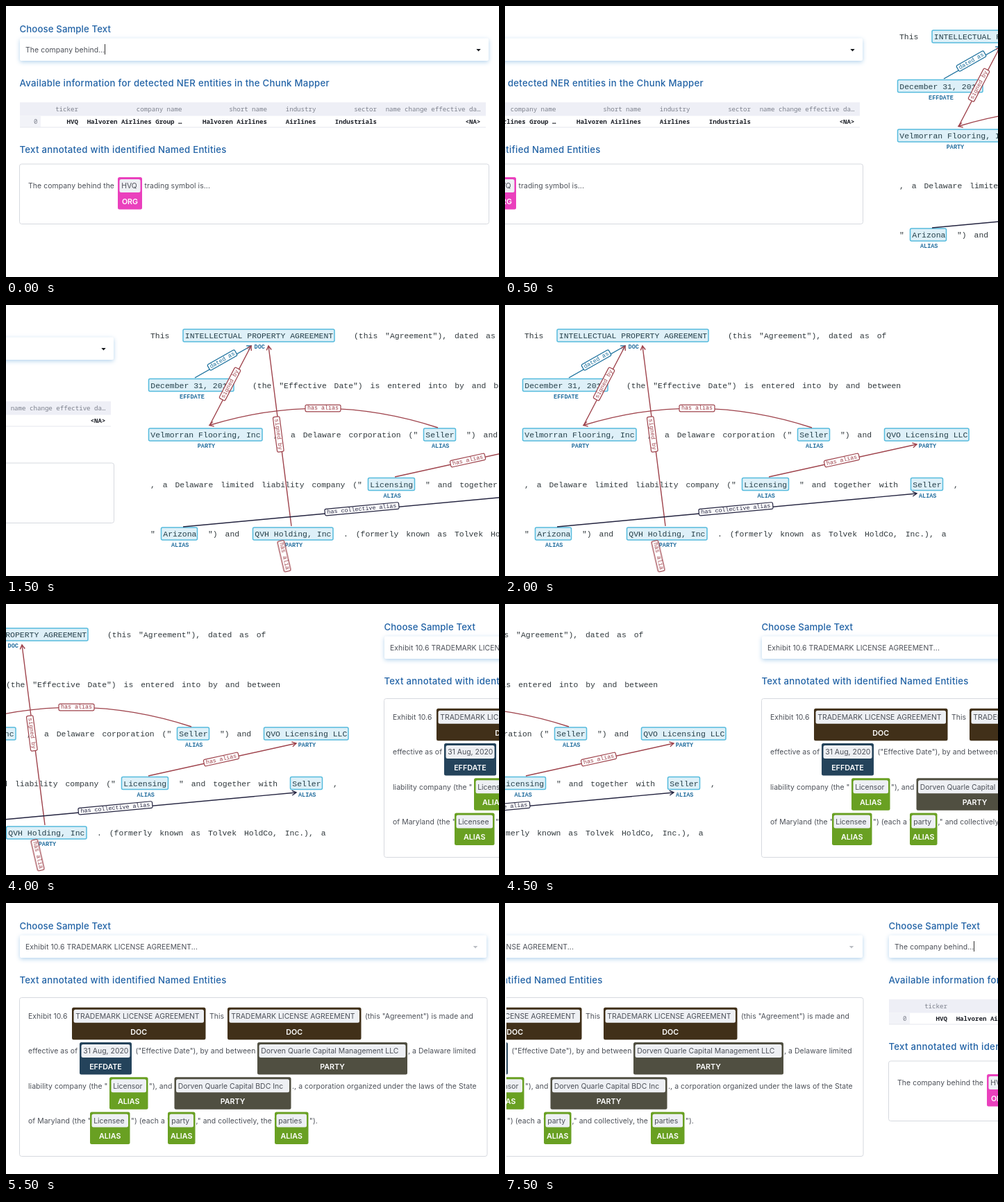
These frames come from a looping animation (710 by 391 pixels, 8 s). An HTML page:

```html
<!DOCTYPE html>
<html lang="en">
<head>
<meta charset="utf-8">
<title>Entity annotation carousel</title>
<style>
  html, body { margin: 0; width: 100%; height: 100%; overflow: hidden; background: #fff; }
  svg { display: block; width: 710px; height: 391px; }
  text { white-space: pre; }
  .sans { font: 400 10.4px Inter, "Open Sans", sans-serif; letter-spacing: .08px; fill: #4c5058; }
  .label, .head { font: 500 13.2px Inter, "Open Sans", sans-serif; letter-spacing: .12px; fill: #2263a6; }
  .head { letter-spacing: .28px; }
  .chip { font: 400 10.45px Inter, "Open Sans", sans-serif; fill: #4c5058; }
  .tag { font: 600 10.7px Inter, "Open Sans", sans-serif; fill: #fff; text-anchor: middle; }
  .th, .td { font: 400 9.13px "Noto Sans Mono", "DejaVu Sans Mono", monospace; fill: #7d818d; text-anchor: end; }
  .td { font-weight: 600; fill: #1d2028; }
  .mono { font: 400 11.42px "Liberation Mono", monospace; fill: #30383c; word-spacing: 4.05px; }
  .ent { font: 400 11.48px "Liberation Mono", monospace; fill: #26404a; }
  .kind { font: 700 8.5px "Liberation Mono", monospace; fill: #246f9f; text-anchor: middle; }
  .rel { font: 400 8.35px "Liberation Mono", monospace; text-anchor: middle; }
  .select { fill: #fff; filter: drop-shadow(0 2px 3px #b4d3ed); }
  .panel { fill: #fff; stroke: #d6d9df; }
</style>
</head>
<body>
<svg viewBox="0 0 710 391">
  <defs><clipPath id="crop"><rect width="710" height="386"/></clipPath></defs>
  <g id="strip"></g>
  <rect id="edge" width="2" height="391" fill="#fff" opacity="0"/>
</svg>
<script>
const NS = "http://www.w3.org/2000/svg";
const strip = document.getElementById("strip");

function add(parent, tag, attrs, text) {
  const el = document.createElementNS(NS, tag);
  for (const key in attrs) el.setAttribute(key, attrs[key]);
  if (text !== undefined) el.textContent = text;
  parent.appendChild(el);
  return el;
}
const slide = x => add(strip, "g", { transform: `translate(${x} 0)` });
const write = (g, cls, x, y, s) => add(g, "text", { class: cls, x, y }, s);
const box = (g, x1, y1, x2, y2, more) =>
  add(g, "rect", { x: x1, y: y1, width: x2 - x1, height: y2 - y1, ...more });

function select(g, right, text, caretX, caretColor) {
  write(g, "label", 19.5, 38.3, "Choose Sample Text");
  box(g, 20, 46.5, right, 79, { class: "select", rx: 2 });
  write(g, "sans", 28, 66.5, text);
  add(g, "path", { d: `M${caretX - 3.2} 62h6.4l-3.2 3.5z`, fill: caretColor });
}

function chip(g, x1, x2, y, text, kind, color) {
  box(g, x1, y, x2, y + 46.5, { rx: 2.5, fill: color });
  box(g, x1 + 2.5, y + 3, x2 - 2.5, y + 22, { rx: 2.5, fill: "#eef0f4" });
  write(g, "chip", x1 + 5.2, y + 16.3, text);
  write(g, "tag", (x1 + x2) / 2, y + 38.8, kind);
}

function tickerSlide(x) {
  const g = slide(x);
  select(g, 695, "The company behind...", 680.5, "#15181c");
  box(g, 142, 55, 143, 70, { fill: "#333" });
  write(g, "head", 19.5, 115.5, "Available information for detected NER entities in the Chunk Mapper");
  box(g, 20, 139, 691, 158.5, { fill: "#eeeff6" });
  box(g, 20, 158.5, 50, 175, { fill: "#f2f3f8" });
  box(g, 20, 174.5, 691, 175.5, { fill: "#e6e7ee" });
  write(g, "th", 45.5, 170, "0");
  const columns = [
    [104, "ticker", "HVQ"],
    [253.5, "company name", "Halvoren Airlines Group …"],
    [376, "short name", "Halvoren Airlines"],
    [446.5, "industry", "Airlines"],
    [534, "sector", "Industrials"],
    [683.5, "name change effective da…", "<NA>"]
  ];
  for (const [right, title, value] of columns) {
    write(g, "th", right, 152, title);
    write(g, "td", right, 170, value);
  }
  write(g, "head", 19.5, 211.5, "Text annotated with identified Named Entities");
  box(g, 19.5, 228, 695.5, 314.5, { class: "panel", rx: 3 });
  write(g, "sans", 32, 263.3, "The company behind the");
  chip(g, 161, 196, 247, "HVQ", "ORG", "#ea40bd");
  write(g, "sans", 199.5, 263.3, "trading symbol is...");
}

const RED = "#9e424b", BLUE = "#146c9a", NAVY = "#23233f";

function arrowHead(g, x, y, angle, color) {
  add(g, "path", {
    d: "M-6-3.5L0 0L-6 3.5", fill: "none", stroke: color, "stroke-width": 1.4,
    transform: `translate(${x} ${y}) rotate(${angle})`
  });
}

function relLabel(g, x, y, angle, width, text, color) {
  const label = add(g, "g", { transform: `translate(${x} ${y}) rotate(${angle})` });
  box(label, -width / 2, -4.8, width / 2, 4.8, { rx: 2, fill: "#fff", stroke: color, "stroke-width": 1.2 });
  add(label, "text", { class: "rel", y: 2.3, fill: color }, text);
}

function relation(g, from, to, color) {
  const [x1, y1] = from, [x2, y2] = to;
  add(g, "path", { d: `M${x1} ${y1}L${x2} ${y2}`, stroke: color, "stroke-width": 1.4 });
  arrowHead(g, x2, y2, Math.atan2(y2 - y1, x2 - x1) * 180 / Math.PI, color);
}

function relationSlide(x) {
  const g = slide(x);
  g.setAttribute("clip-path", "url(#crop)");
  const line = row => 48 + row * 71.5;

  const prose = [
    [28, 0, "This"], [321, 0, '(this "Agreement"), dated as of'],
    [175, 1, '(the "Effective Date") is entered into by and between'],
    [205, 2, ","], [230, 2, 'a Delaware corporation ("'], [483, 2, '") and'],
    [28, 3, ', a Delaware limited liability company ("'],
    [424, 3, '" and together with'], [646, 3, ","],
    [28, 4, '"'], [111, 4, '") and'],
    [306, 4, ". (formerly known as Tolvek HoldCo, Inc.), a"]
  ];
  for (const [px, row, s] of prose) write(g, "mono", px, line(row), s);

  const entities = [
    [75, 293, 0, "INTELLECTUAL PROPERTY AGREEMENT", "DOC"],
    [25.5, 148, 1, "December 31, 2018", "EFFDATE"],
    [25.5, 189, 2, "Velmorran Flooring, Inc", "PARTY"],
    [421.5, 467.5, 2, "Seller", "ALIAS"],
    [546.5, 668, 2, "QVO Licensing LLC", "PARTY"],
    [341.5, 408.5, 3, "Licensing", "ALIAS"],
    [584.5, 630.5, 3, "Seller", "ALIAS"],
    [43.5, 95.5, 4, "Arizona", "ALIAS"],
    [175.5, 291, 4, "QVH Holding, Inc", "PARTY"]
  ];
  for (const [x1, x2, row, s, kind] of entities) {
    const y = line(row);
    box(g, x1, y - 13, x2, y + 5, { rx: 2, fill: "#def0f8", stroke: "#55bbdd", "stroke-width": 1.5 });
    write(g, "ent", x1 + 2.8, y, s);
    write(g, "kind", (x1 + x2) / 2 + 1.2, y + 15, kind);
  }

  relation(g, [92, 105], [173, 59], BLUE);
  relation(g, [113, 174], [173, 59], RED);
  relation(g, [231, 319], [198, 59], RED);
  relation(g, [380, 248], [593, 201], RED);
  relation(g, [75, 320], [593, 272], NAVY);
  add(g, "path", { d: "M442 177Q277 123 113 173.5", fill: "none", stroke: RED, "stroke-width": 1.4 });
  arrowHead(g, 113, 173.5, 163, RED);

  relLabel(g, 131.5, 79.5, -29.5, 45, "dated as", BLUE);
  relLabel(g, 142.5, 114, -62.4, 50, "signed by", RED);
  relLabel(g, 212.3, 186.5, 82.7, 51, "signed by", RED);
  relLabel(g, 276.5, 149, 0, 51, "has alias", RED);
  relLabel(g, 485, 224, -12.4, 51, "has alias", RED);
  relLabel(g, 332.5, 294.3, -5.3, 107, "has collective alias", NAVY);
  relLabel(g, 220.5, 362.3, 77, 45, "has alia", RED);
}

function licenseSlide(x) {
  const g = slide(x);
  select(g, 692, "Exhibit 10.6 TRADEMARK LICENSE AGREEMENT...", 676, "#b9bcc2");
  write(g, "head", 19.5, 115.5, "Text annotated with identified Named Entities");
  box(g, 19.5, 136.5, 693, 365.5, { class: "panel", rx: 3 });
  const top = row => 150.8 + row * 50.2;

  const prose = [
    [32, 0, "Exhibit 10.6"], [293, 0, "This"], [517, 0, '(this "Agreement") is made and'],
    [32, 1, "effective as of"], [186.5, 1, '("Effective Date"), by and between'],
    [579, 1, ", a Delaware limited"],
    [32, 2, 'liability company (the "'], [206, 2, '"), and'],
    [412, 2, "., a corporation organized under the laws of the State"],
    [32, 3, 'of Maryland (the "'], [180, 3, '") (each a "'],
    [273.5, 3, '," and collectively, the "'], [437, 3, '").']
  ];
  for (const [px, row, s] of prose) write(g, "sans", px, top(row) + 16.3, s);

  const colors = { DOC: "#413019", EFFDATE: "#24435b", PARTY: "#504f41", ALIAS: "#69a022" };
  const chips = [
    [95, 287.5, 0, "TRADEMARK LICENSE AGREEMENT", "DOC"],
    [319, 511.5, 0, "TRADEMARK LICENSE AGREEMENT", "DOC"],
    [106, 181, 1, "31 Aug, 2020", "EFFDATE"],
    [362, 578, 1, "Dorven Quarle Capital Management LLC", "PARTY"],
    [149, 204.5, 2, "Licensor", "ALIAS"],
    [242.5, 410.5, 2, "Dorven Quarle Capital BDC Inc", "PARTY"],
    [121, 178.5, 3, "Licensee", "ALIAS"],
    [233, 272.5, 3, "party", "ALIAS"],
    [387, 435.5, 3, "parties", "ALIAS"]
  ];
  for (const [x1, x2, row, s, kind] of chips) chip(g, x1, x2, top(row), s, kind, colors[kind]);
}

tickerSlide(0);
relationSlide(720);
licenseSlide(1420);
tickerSlide(2130);

// Each entry holds its scroll position until the next time.
const LOOP = 8000;
const stops = [
  [0, 0], [500, 180], [1000, 360], [1500, 540], [2000, 720],
  [4000, 895], [4500, 1070], [5000, 1245], [5500, 1420],
  [7500, 1597], [LOOP, 1597]
];
const timing = { duration: LOOP, iterations: Infinity };
strip.animate(stops.map(([t, x]) => ({
  offset: t / LOOP, transform: `translateX(${-x}px)`, easing: "step-end"
})), timing);
document.getElementById("edge").animate([
  { offset: 0, opacity: 0, easing: "step-end" },
  { offset: 7500 / LOOP, opacity: 1, easing: "step-end" },
  { offset: 1, opacity: 1 }
], timing);
</script>
</body>
</html>
```
